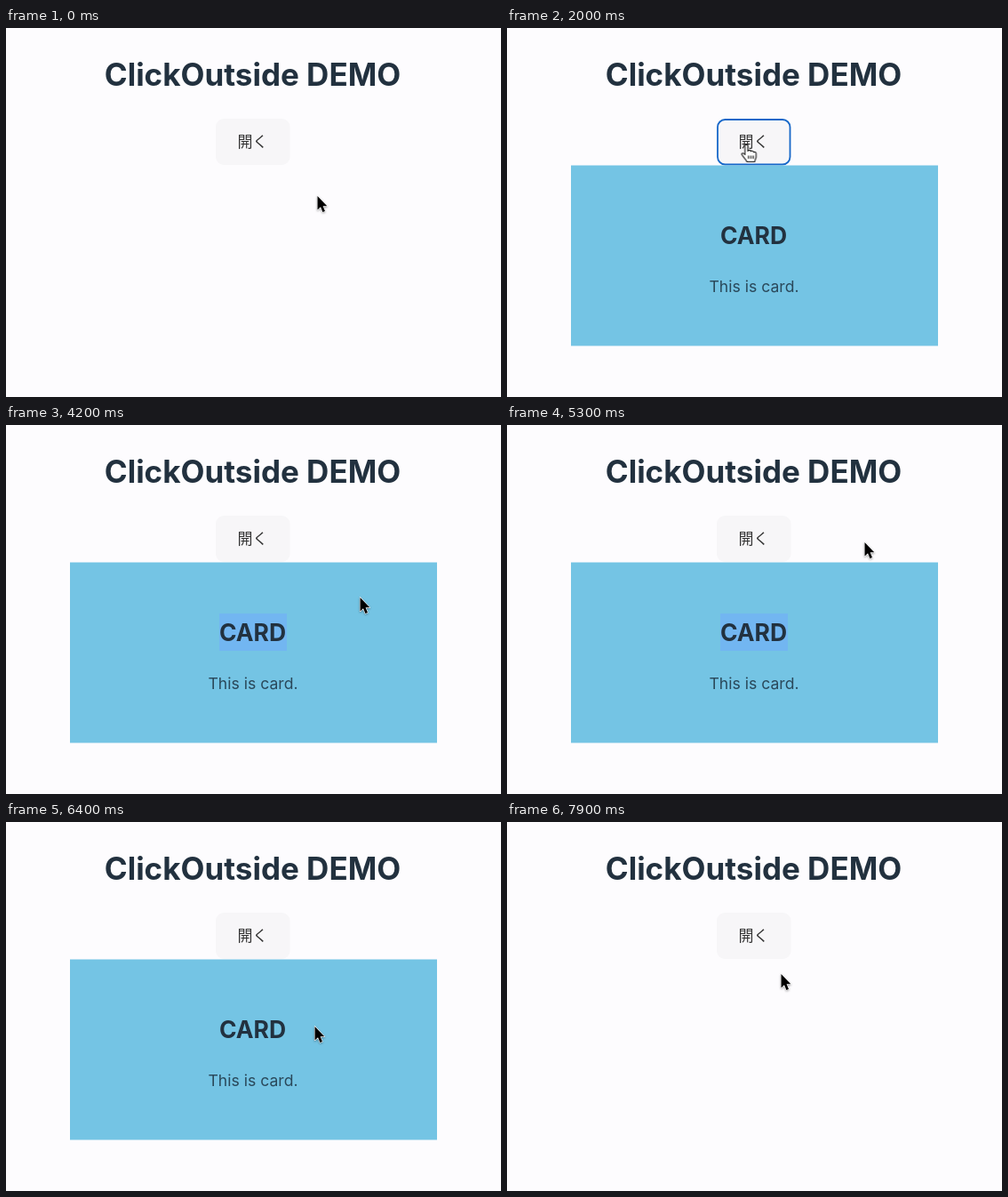
These frames come from a looping animation (557x415 px, 8 s). An HTML page:

```html
<!DOCTYPE html>
<html lang="ja">
<head>
<meta charset="utf-8">
<title>ClickOutside DEMO</title>
<style>
html, body { margin: 0; width: 100%; height: 100%; overflow: hidden; background: #fdfcfe; }
svg { display: block; width: 557px; height: 415px; }

text { font-family: Inter, "Liberation Sans", sans-serif; font-optical-sizing: none; text-anchor: middle; fill: #22313f; }
.title { font-size: 35px; font-weight: 700; }
.label { font: 300 17px "Noto Sans CJK JP", "Noto Sans CJK", sans-serif; fill: #333; }
.heading { font-size: 26.5px; font-weight: 700; }
.body { font-size: 17.6px; fill: #2a485a; }

.button { fill: #f7f6f8; }
.ring { fill: none; stroke: #1768c9; stroke-width: 1.8; }
.panel { fill: #74c4e4; }
.selection { fill: #72b6f1; }
.arrow { fill: #000; stroke: #fff; stroke-width: 1.2; stroke-linejoin: round; paint-order: stroke; filter: drop-shadow(0 1px 1px #0005); }
.hand { fill: #fff; stroke: #222; stroke-width: 1.2; stroke-linejoin: round; }

.cursor, .card, .selection, .hover, .idle { animation: 8s step-end infinite; }
.cursor { animation-name: move; }
.card { animation-name: card; }
.selection { animation-name: select; }
.hover { animation-name: hover; }
.idle { animation-name: idle; }

/* one step per 100 ms */
@keyframes move {
  0% { transform: translate(350px, 189px); animation-timing-function: steps(3); }
  3.75% { transform: translate(303px, 150px); animation-timing-function: steps(4); }
  8.75%, 22.5% { transform: translate(267px, 131px); animation-timing-function: steps(2); }
  25%, 28.75% { transform: translate(269.5px, 131px); animation-timing-function: steps(5); }
  35% { transform: translate(284px, 222px); animation-timing-function: steps(3); }
  38.75%, 42.5% { transform: translate(292px, 236px); animation-timing-function: steps(4); }
  47.5% { transform: translate(375px, 202px); animation-timing-function: steps(3); }
  51.25% { transform: translate(397.5px, 195px); animation-timing-function: step-end; }
  52.5%, 53.75% { transform: translate(398px, 194px); animation-timing-function: steps(5); }
  60% { transform: translate(426px, 170px); animation-timing-function: steps(4); }
  65%, 66.25% { transform: translate(402px, 132px); animation-timing-function: steps(3); }
  70% { transform: translate(308px, 128px); animation-timing-function: steps(2); }
  72.5%, 76.25% { transform: translate(264px, 121px); animation-timing-function: steps(3); }
  80% { transform: translate(347px, 230px); animation-timing-function: steps(6); }
  87.5% { transform: translate(468px, 262px); animation-timing-function: steps(3); }
  91.25%, 93.75% { transform: translate(533px, 275px); animation-timing-function: steps(4); }
  98.75%, 100% { transform: translate(308px, 171px); }
}
@keyframes card {
  0%, 67.5%, 93.75%, 100% { opacity: 0; }
  13.75%, 75% { opacity: 1; }
}
@keyframes select {
  0%, 67.5%, 100% { opacity: 0; }
  42.5% { opacity: 1; }
}
@keyframes hover {
  0%, 31.25%, 77.5%, 100% { opacity: 0; }
  3.75%, 70% { opacity: 1; }
}
@keyframes idle {
  0%, 31.25%, 77.5%, 100% { opacity: 1; }
  3.75%, 70% { opacity: 0; }
}
</style>
</head>
<body>
<svg viewBox="0 0 557 415">
  <text class="title" x="277.5" y="65">ClickOutside DEMO</text>

  <rect class="button" x="236" y="102" width="83.5" height="52" rx="9"/>
  <rect class="ring hover" x="237" y="103" width="81.5" height="50.5" rx="8.5"/>
  <text class="label" x="277.5" y="134">開く</text>

  <g class="card">
    <rect class="panel" x="72" y="154.5" width="413" height="203"/>
    <rect class="selection" x="240" y="212" width="76" height="42"/>
    <text class="heading" x="277.5" y="243">CARD</text>
    <text class="body" x="278" y="296.5">This is card.</text>
  </g>

  <g class="cursor">
    <path class="arrow idle" d="M.5 0V15.5L4 12.2L6.4 18L9 16.9L6.6 11.3H11.3Z"/>
    <g class="hand hover">
      <path d="M-1.7 11.5V1.6C-1.7-.4 1.5-.4 1.5 1.6V7.5C2 6 4.6 6 4.8 7.8C5.4 6.8 7.8 7 8 8.8C8.8 8 10.8 8.4 10.8 10.2V14C10.8 16 9.5 17 9.2 19.5H.5C0 17.5-3 15-5 11.8C-6.2 9.8-3.8 8.6-1.7 11.5Z"/>
      <path d="M2.3 12.5V16M5 12.5V16M7.6 12.5V16"/>
    </g>
  </g>
</svg>
</body>
</html>
```
